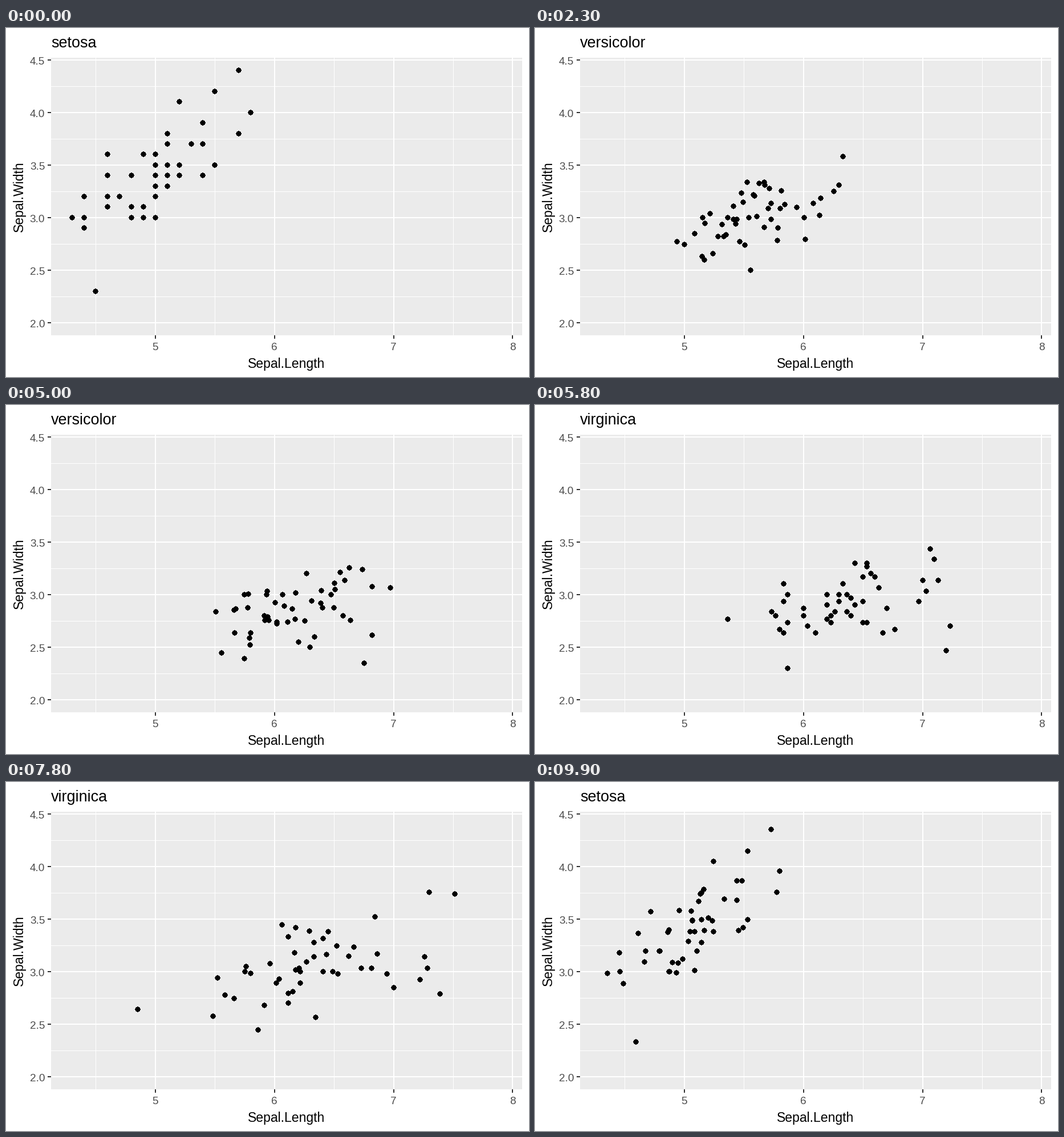
A matplotlib script that plays this animation: 917 by 611 pixels, repeating every 10 s.

```python
import numpy as np
import matplotlib.pyplot as plt
from matplotlib.animation import FuncAnimation
from matplotlib.collections import PolyCollection
from matplotlib.patches import Rectangle

W, H, DPI = 917, 611, 128
LEFT, RIGHT, TOP, BOTTOM = 78.6, 905.54, 52.6, 538.4
X_RANGE, Y_RANGE = (4.12, 8.08), (1.88, 4.52)

plt.rcParams["font.family"] = "Liberation Sans"

# Iris sepal measurements, rows in data set order
setosa_length = [
    5.1, 4.9, 4.7, 4.6, 5.0, 5.4, 4.6, 5.0, 4.4, 4.9, 5.4, 4.8, 4.8, 4.3, 5.8, 5.7, 5.4,
    5.1, 5.7, 5.1, 5.4, 5.1, 4.6, 5.1, 4.8, 5.0, 5.0, 5.2, 5.2, 4.7, 4.8, 5.4, 5.2, 5.5,
    4.9, 5.0, 5.5, 4.9, 4.4, 5.1, 5.0, 4.5, 4.4, 5.0, 5.1, 4.8, 5.1, 4.6, 5.3, 5.0]
setosa_width = [
    3.5, 3.0, 3.2, 3.1, 3.6, 3.9, 3.4, 3.4, 2.9, 3.1, 3.7, 3.4, 3.0, 3.0, 4.0, 4.4, 3.9,
    3.5, 3.8, 3.8, 3.4, 3.7, 3.6, 3.3, 3.4, 3.0, 3.4, 3.5, 3.4, 3.2, 3.1, 3.4, 4.1, 4.2,
    3.1, 3.2, 3.5, 3.6, 3.0, 3.4, 3.5, 2.3, 3.2, 3.5, 3.8, 3.0, 3.8, 3.2, 3.7, 3.3]
versicolor_length = [
    7.0, 6.4, 6.9, 5.5, 6.5, 5.7, 6.3, 4.9, 6.6, 5.2, 5.0, 5.9, 6.0, 6.1, 5.6, 6.7, 5.6,
    5.8, 6.2, 5.6, 5.9, 6.1, 6.3, 6.1, 6.4, 6.6, 6.8, 6.7, 6.0, 5.7, 5.5, 5.5, 5.8, 6.0,
    5.4, 6.0, 6.7, 6.3, 5.6, 5.5, 5.5, 6.1, 5.8, 5.0, 5.6, 5.7, 5.7, 6.2, 5.1, 5.7]
versicolor_width = [
    3.2, 3.2, 3.1, 2.3, 2.8, 2.8, 3.3, 2.4, 2.9, 2.7, 2.0, 3.0, 2.2, 2.9, 2.9, 3.1, 3.0,
    2.7, 2.2, 2.5, 3.2, 2.8, 2.5, 2.8, 2.9, 3.0, 2.8, 3.0, 2.9, 2.6, 2.4, 2.4, 2.7, 2.7,
    3.0, 3.4, 3.1, 2.3, 3.0, 2.5, 2.6, 3.0, 2.6, 2.3, 2.7, 3.0, 2.9, 2.9, 2.5, 2.8]
virginica_length = [
    6.3, 5.8, 7.1, 6.3, 6.5, 7.6, 4.9, 7.3, 6.7, 7.2, 6.5, 6.4, 6.8, 5.7, 5.8, 6.4, 6.5,
    7.7, 7.7, 6.0, 6.9, 5.6, 7.7, 6.3, 6.7, 7.2, 6.2, 6.1, 6.4, 7.2, 7.4, 7.9, 6.4, 6.3,
    6.1, 7.7, 6.3, 6.4, 6.0, 6.9, 6.7, 6.9, 5.8, 6.8, 6.7, 6.7, 6.3, 6.5, 6.2, 5.9]
virginica_width = [
    3.3, 2.7, 3.0, 2.9, 3.0, 3.0, 2.5, 2.9, 2.5, 3.6, 3.2, 2.7, 3.0, 2.5, 2.8, 3.2, 3.0,
    3.8, 2.6, 2.2, 3.2, 2.8, 2.8, 2.7, 3.3, 3.2, 2.8, 3.0, 2.8, 3.0, 2.8, 3.8, 2.8, 2.8,
    2.6, 3.0, 3.4, 3.1, 3.0, 3.1, 3.1, 3.1, 2.7, 3.2, 3.3, 3.0, 2.5, 3.0, 3.4, 3.0]

names = ["setosa", "versicolor", "virginica"]
states = [np.column_stack(pair) for pair in (
    (setosa_length, setosa_width),
    (versicolor_length, versicolor_width),
    (virginica_length, virginica_width))]
# Each transition: last still frame, first frame of the next state
moves = [(6, 33), (40, 67), (74, 100)]


def px(x):
    return LEFT + (x - X_RANGE[0]) / (X_RANGE[1] - X_RANGE[0]) * (RIGHT - LEFT)


def py(y):
    return BOTTOM - (y - Y_RANGE[0]) / (Y_RANGE[1] - Y_RANGE[0]) * (BOTTOM - TOP)


fig = plt.figure(figsize=(W / DPI, H / DPI), dpi=DPI, facecolor="white")
ax = fig.add_axes([0, 0, 1, 1])
ax.set(xlim=(0, W), ylim=(H, 0))
ax.axis("off")


def box(x0, y0, x1, y1, color, z):
    ax.add_patch(Rectangle((x0, y0), x1 - x0, y1 - y0, facecolor=color,
                           linewidth=0, antialiased=False, zorder=z))


def label(x, y, text, size, **kw):
    return ax.text(x, y, text, fontsize=size * 72 / DPI,
                   **{"va": "baseline", "ha": "center", "color": "black", **kw})


x0, x1, y0, y1 = 79, 905, 52, 538
box(x0, y0, x1, y1, "#EBEBEB", 0)
for v in np.arange(4.5, 8, 1):
    p = int(px(v))
    box(p, y0, p + 1, y1, "white", 1)
for v in np.arange(2.25, 4.5, 0.5):
    p = int(py(v))
    box(x0, p, x1, p + 1, "white", 1)
for v in range(5, 9):
    p = int(px(v))
    box(p - 1, y0, p + 1, y1, "white", 2)
    box(p - 1, y1, p + 1, y1 + 6, "#333333", 2)
    label(px(v) - 0.5, 564, str(v), 19, color="#4D4D4D")
for v in np.arange(2, 4.6, 0.5):
    p = int(py(v))
    box(x0, p - 1, x1, p + 1, "white", 2)
    box(x0 - 6, p - 1, x0, p + 1, "#333333", 2)
    label(68.3, round(py(v) + 7.5), f"{v:.1f}", 19, ha="right", color="#4D4D4D")

label((LEFT + RIGHT) / 2, 595, "Sepal.Length", 23)
label(30, (TOP + BOTTOM) / 2, "Sepal.Width", 23, rotation=90, ha="right")\
    .set(va="center", rotation_mode="default", x=35)
title = label(79, 34, names[0], 27, ha="left")

angle = np.linspace(0, 2 * np.pi, 48, endpoint=False)
ring = 4.05 * np.column_stack([np.cos(angle), np.sin(angle)])
dots = PolyCollection([ring], facecolor="black", linewidth=0,
                      antialiased=False, zorder=3)
ax.add_collection(dots, autolim=False)


def pose(frame):
    """Point positions and name of the nearest state."""
    for i, (start, end) in enumerate(moves):
        if frame < end:
            t = max(0, (frame - start) / (end - start))
            j = (i + 1) % 3
            return states[i] + (states[j] - states[i]) * t, names[j if t >= 0.5 else i]
    return states[0], names[0]


def draw(frame):
    data, name = pose(frame)
    centres = np.floor(np.column_stack([px(data[:, 0]), py(data[:, 1])]))
    dots.set_verts(centres[:, None, :] + ring)
    title.set_text(name)
    return dots, title


anim = FuncAnimation(fig, draw, frames=100, interval=100, repeat=True,
                     repeat_delay=0, blit=False)
plt.show()
```
